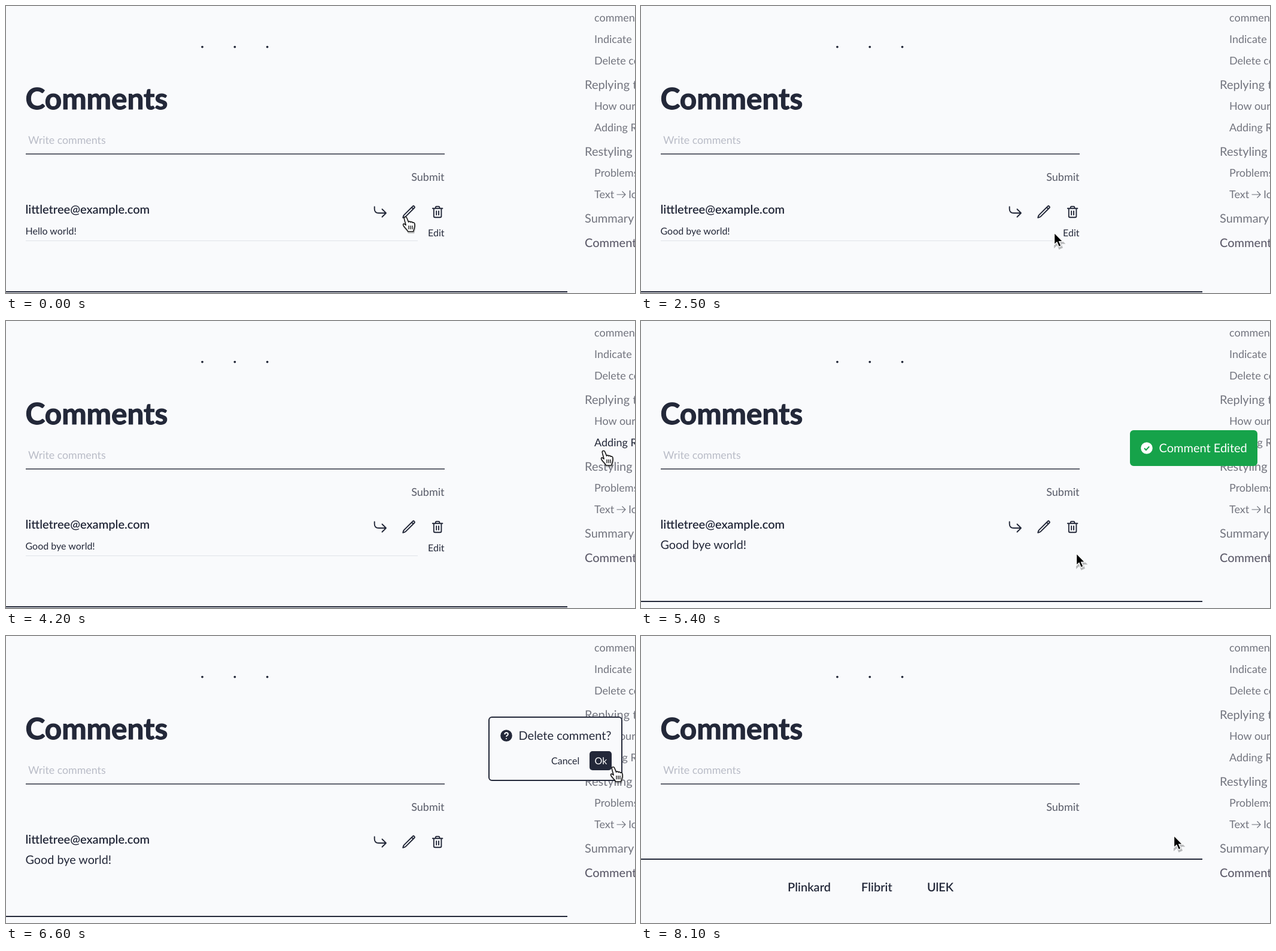
Write an HTML page that moves like this. It is 1051 by 481 pixels and loops after 8.42 s.

```html
<!DOCTYPE html>
<html lang="en">
<head>
<meta charset="utf-8">
<title>Comments</title>
<style>
  html, body { margin: 0; width: 100%; height: 100%; overflow: hidden; background: #f9fafc; }
  svg { display: block; width: 1051px; height: 481px; }
  text { font-family: Lato, "Open Sans", sans-serif; fill: #232839; white-space: pre; text-rendering: geometricPrecision; }
  .side text { fill: #73757f; }
  .side .current { font-weight: 500; fill: #5f5d6c; }
  .line { fill: none; stroke: #232839; stroke-width: 1.9; stroke-linecap: round; stroke-linejoin: round; }
</style>
</head>
<body>
<svg viewBox="0 0 1051 481">
  <defs>
    <path id="arrowShape" d="M0 0V19.300L4.300 15.300 7.400 22.600 11 21 7.900 14H13.600Z"/>
    <path id="handShape" d="M3 4C3 1.500 6.500 1 7.300 3.500L10 10c1-1.500 3-1 3.400.3 1-1 2.800-.6 3.200.8 1.200-.8 2.900 0 3 1.600.4 3 .4 5-.7 7.500L17.500 25H9.200C8 22 5 20 2.500 16.500.5 14 1.500 12.500 3.500 13L5.800 14.800C5 11 3.500 7 3 4Z"/>
  </defs>
  <rect width="1051" height="481" fill="#f9fafc"/>
  <path d="M328 68.600h.01m54.300 0h.01m54.300 0h.01" stroke="#232839" stroke-width="3.800" stroke-linecap="round"/>
  <text x="32.500" y="173" font-size="49.500" font-weight="700" stroke="#232839" stroke-width="1.200">Comments</text>
  <text x="37" y="231" font-size="17.800" style="fill:#b9bcc7">Write comments</text>
  <rect x="33" y="247" width="700" height="2" fill="#60636f"/>
  <text x="732.500" y="293" font-size="18" text-anchor="end" style="fill:#585b68">Submit</text>

  <g id="comment">
    <text x="32.500" y="348" font-size="20" font-weight="600">littletree@example.com</text>
    <g class="line">
      <path d="M615.700 336.500v3.500q0 7 7 7h12.300M628.500 340.500l6.500 6.500-6.500 6.500"/>
      <path transform="translate(661 333)" d="M16.900 4.500l1.600-1.700a1.900 1.900 0 1 1 2.700 2.700L6.800 19.800a4.500 4.500 0 0 1-1.900 1.100l-2.700.9.8-2.700a4.500 4.500 0 0 1 1.200-1.900L16.900 4.500M16.900 4.500l2.600 2.600"/>
      <path d="M712.800 339.300h16.600M714.800 339.500v12.700q0 2 2 2h8.600q2 0 2-2v-12.700M717.800 339v-1.300q0-1.800 1.800-1.800h3q1.800 0 1.800 1.800v1.300M719.200 343.800v6.200M723 343.800v6.200"/>
    </g>
    <g id="form">
      <text id="field" x="32.500" y="383" font-size="16"></text>
      <rect id="caret" y="367.500" width="1.200" height="19" fill="#111"/>
      <rect x="33" y="393" width="655" height="1" fill="#e0e3e9"/>
      <text x="732.500" y="386" font-size="16" text-anchor="end">Edit</text>
    </g>
    <text id="saved" x="32.500" y="382" font-size="19.800">Good bye world!</text>
  </g>

  <g id="foot">
    <rect y="-1" width="938" height="2" fill="#232839"/>
    <g font-size="20" font-weight="600">
      <text x="245" y="54">Plinkard</text><text x="368" y="54">Flibrit</text><text x="478" y="54">UlEK</text>
    </g>
  </g>

  <g id="side" class="side"></g>
  <g id="toasts"></g>
  <g id="arrow">
    <use href="#arrowShape" x="1" y="2.500" opacity=".25" stroke="#000" stroke-width="3"/>
    <use href="#arrowShape" stroke="#fff" stroke-width="1.300"/>
  </g>
  <g id="hand">
    <use href="#handShape" x=".8" y="2" opacity=".22" stroke="#000" stroke-width="2"/>
    <use href="#handShape" fill="#fff" stroke="#1a1a1a" stroke-width="1.500" stroke-linejoin="round"/>
    <path d="M10.400 15.500v6M13.200 15.500v6M16 15.500v6" stroke="#1a1a1a" stroke-width="1.300"/>
  </g>
</svg>
<script>
const LOOP = 8420, STEP = 50;
const EDITED = 4350, DELETED = 6950;
const DARK = '#232839', GREEN = '#16a34a', PAGE = '#f9fafc';
const $ = id => document.getElementById(id);
const span = (t, a, b) => Math.min(1, Math.max(0, (t - a) / (b - a)));
const ease = p => p * p * (3 - 2 * p);
const show = (el, on) => el.setAttribute('display', on ? 'inline' : 'none');
const move = (el, x, y, s = 1) => el.setAttribute('transform', `translate(${x} ${y}) scale(${s})`);

// Table of contents; a leading dash marks a nested entry
const entries = ['-comments', '-Indicate edited', '-Delete comments', 'Replying to', '-How our',
  '-Adding Replies', 'Restyling', '-Problems', '-Text', 'Summary', 'Comments'];
let baseline = -9.400;
for (const entry of entries) {
  const nested = entry[0] === '-';
  baseline += nested ? 35.700 : 40.800;
  $('side').innerHTML += `<text x="${nested ? 983 : 967}" y="${baseline}" font-size="${nested ? 18 : 20}">${entry.replace('-', '')}</text>`;
}
$('side').lastChild.setAttribute('class', 'current');
const hovered = $('side').children[5];
$('side').innerHTML += '<text x="1040" y="322" font-size="18">Icon</text>' +
  '<path d="M1020.500 316H1035M1029.500 310.500L1035 316l-5.500 5.500" fill="none" stroke="#6b6e79" stroke-width="1.100"/>';

// Keyboard bursts: [start, end, text, length before, length after]
const bursts = [
  [0, 300, 'Hello world!', 12, 0],
  [450, 500, 'Good bye world!', 0, 1],
  [700, 1150, 'Good bye world!', 1, 7],
  [1300, 1350, 'Good bye world!', 7, 8],
  [1450, 1900, 'Good bye world!', 8, 15]
];

// Pointer moves: [start, end, x, y, shape at rest]
const moves = [
  [-1, 0, 668, 354, 'hand'],
  [2300, 2700, 712, 405],
  [2700, 3000, 736, 389, 'hand'],
  [3150, 3200, 731, 383],
  [3500, 3900, 999, 218, 'hand'],
  [4300, 4350, 990, 217],
  [4700, 4850, 982, 214],
  [5050, 5300, 750, 406],
  [5300, 5400, 727, 389],
  [5700, 5800, 725, 350, 'hand'],
  [6100, 6600, 1015, 220, 'hand'],
  [6750, 7000, 1030, 256],
  [7000, 7100, 974, 316],
  [7250, 7500, 955, 322],
  [7650, 7700, 890, 334]
];

// from: first visible, start: begin of slide-in, out: begin of slide-out
const toasts = [
  { label: 'Edit comment?', left: 832, ask: true, bg: GREEN, ink: '#fff', from: 3150, start: 3100, out: 3950 },
  { label: 'Comment Edited', left: 817, bg: GREEN, ink: '#fff', from: EDITED, start: 4450, out: 5700 },
  { label: 'Delete comment?', left: 806, ask: true, bg: PAGE, ink: DARK, from: 5850, start: 5800, out: 6650 },
  { label: 'Comment Deleted', left: 805, bg: GREEN, ink: '#fff', from: 7300, start: 7200, out: 7800 }
];

function buildToast(o) {
  const { left, bg, ink, ask } = o;
  const top = ask ? 136 : 184, mid = ask ? 167 : 213, icon = left + (ask ? 30 : 28);
  const word = (x, y, size, color, s) => `<text x="${x}" y="${y}" font-size="${size}" style="fill:${color}">${s}</text>`;
  const mark = ask
    ? `M${icon - 2.700} ${mid - 2}q0-3 2.800-3t2.800 2.600q0 1.500-1.600 2.300-1.200.6-1.200 1.800M${icon} ${mid + 4.200}v1.600`
    : `M${icon - 4} ${mid + 0.300}l2.900 2.900 5.300-5.800`;
  o.el = document.createElementNS('http://www.w3.org/2000/svg', 'g');
  o.el.innerHTML =
    `<rect x="${left + 1}" y="${top}" width="${1028 - left}" height="${242 - top}" rx="5" fill="${bg}" stroke="${bg === PAGE ? DARK : bg}" stroke-width="2"/>` +
    `<circle cx="${icon}" cy="${mid}" r="9.800" fill="${ink}"/>` +
    `<path d="${mark}" fill="none" stroke="${bg}" stroke-width="2"/>` +
    word(icon + 20.500, mid + 7, 20, ink, o.label) +
    (ask ? word(911, 215, 16, ink, 'Cancel') +
      `<rect x="975" y="193" width="37" height="32" rx="5" fill="${DARK}"/>` +
      word(983.500, 215, 16, '#fff', 'Ok') : '');
  $('toasts').append(o.el);
}
toasts.forEach(buildToast);

function drawToast(o, t) {
  const enter = Math.max(1 / 3, span(t, o.start, o.start + 150));
  const leave = span(t, o.out, o.out + 100);
  const scale = 0.965 + 0.035 * enter;
  const dx = 95.500 * (1 - enter) + 30 * leave;
  const cx = (o.left + 1030) / 2, cy = o.ask ? 189 : 213;
  show(o.el, t >= o.from && leave < 1);
  move(o.el, cx * (1 - scale) + dx, cy * (1 - scale), scale);
  o.el.setAttribute('opacity', Math.pow(enter, 1.700) * (1 - leave));
}

function drawPointer(t) {
  let x = 0, y = 0, shape;
  for (const [a, b, toX, toY, rest] of moves) {
    if (t <= a) break;
    const p = ease(span(t, a, b));
    x += (toX - x) * p;
    y += (toY - y) * p;
    shape = p === 1 ? rest : '';
  }
  const visible = t < 50 || t >= 2350;
  show($('hand'), visible && shape === 'hand');
  show($('arrow'), visible && shape !== 'hand');
  move($('hand'), x - 6, y - 2.500, 1.060);
  move($('arrow'), x + 0.500, y + 0.500, 1.040);
}

function drawField(t) {
  const [a, b, text, before, after] = bursts.filter(k => k[0] <= t).pop();
  const field = $('field');
  field.textContent = text.slice(0, Math.round(before + (after - before) * span(t, a, b)));
  const caretOn = (t >= 50 && t < 2350) || (t >= 2850 && t < 3100);
  show($('caret'), caretOn);
  $('caret').setAttribute('x', 33 + (field.textContent ? field.getComputedTextLength() : 0));
}

function draw(t) {
  const edited = t >= EDITED, deleted = t >= DELETED;
  show($('comment'), !deleted);
  show($('form'), !edited);
  show($('saved'), edited);
  if (!edited) drawField(t);
  move($('foot'), 0, deleted ? 374 : edited ? 470 : 479);
  $('side').children[5].style.fill = t >= 4050 && !edited ? DARK : '';
  toasts.forEach(o => drawToast(o, t));
  drawPointer(t);
}

const begin = performance.now();
function tick() {
  const t = (performance.now() - begin) % LOOP;
  draw(Math.floor(t / STEP) * STEP);
  requestAnimationFrame(tick);
}
tick();
</script>
</body>
</html>
```
